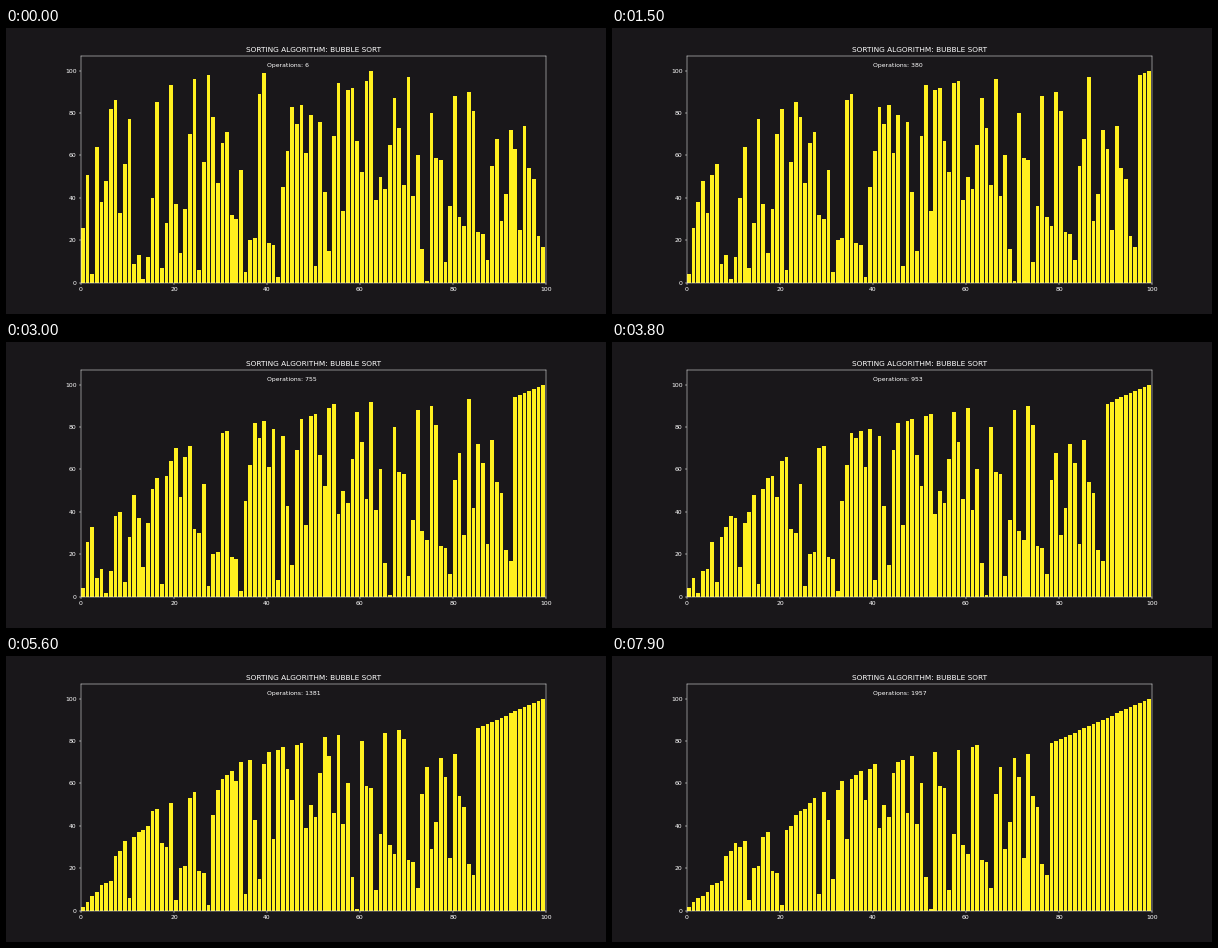
A matplotlib script for the animation above (8 s loop, 600 by 286 pixels).

```python
import numpy as np
import matplotlib.pyplot as plt
from matplotlib.animation import FuncAnimation

W, H, DPI = 600, 286, 44
FRAMES, INTERVAL = 80, 100
BG, BAR = "#19171a", "#fff01f"

START = [
    82, 26, 51, 4, 64, 38, 48, 86, 33, 56, 77, 9, 13, 2, 12, 40, 85, 7, 28, 93,
    37, 14, 35, 70, 96, 6, 57, 98, 78, 47, 66, 71, 32, 30, 53, 5, 20, 21, 89, 99,
    19, 18, 3, 45, 62, 83, 75, 84, 61, 79, 8, 76, 43, 15, 69, 94, 34, 91, 92, 67,
    52, 95, 100, 39, 50, 44, 65, 87, 73, 46, 97, 41, 60, 16, 1, 80, 59, 58, 10, 36,
    88, 31, 27, 90, 81, 24, 23, 11, 55, 68, 29, 42, 72, 63, 25, 74, 54, 49, 22, 17,
]


def bubble_sort(values):
    """Yield the list before sorting and after every comparison."""
    a = list(values)
    yield a[:]
    for end in range(len(a) - 1, 0, -1):
        for j in range(end):
            if a[j] > a[j + 1]:
                a[j], a[j + 1] = a[j + 1], a[j]
            yield a[:]


states = list(bubble_sort(START))

# The sorting speed drifts slightly around 25 comparisons per frame.
ops = np.interp(np.arange(FRAMES),
                [0, 15, 23, 38, 56, 68, 79],
                [6, 380, 582, 953, 1381, 1684, 1957]).round().astype(int)

plt.rcParams.update({
    "font.family": "DejaVu Sans",
    "text.color": "white",
    "axes.edgecolor": "white",
    "xtick.color": "white",
    "ytick.color": "white",
    "toolbar": "None",
})

fig = plt.figure(figsize=(W / DPI, H / DPI), dpi=DPI, facecolor=BG)
ax = fig.add_axes([0.125, 31.1 / H, 0.775, 227.2 / H], facecolor=BG)
ax.set_title("SORTING ALGORITHM: BUBBLE SORT", fontsize=12)
bars = ax.bar(range(len(START)), START, width=0.8, align="edge", color=BAR)
ax.set_xlim(0, 100)
ax.set_ylim(0, 107)
label = ax.text(0.4, 0.95, "", transform=ax.transAxes, fontsize=10)


def update(frame):
    n = ops[frame]
    for bar, value in zip(bars, states[n]):
        bar.set_height(value)
    label.set_text(f"Operations: {n}")
    return [*bars, label]


anim = FuncAnimation(fig, update, frames=FRAMES, interval=INTERVAL,
                     repeat=True, repeat_delay=0, blit=False)
plt.show()
```
